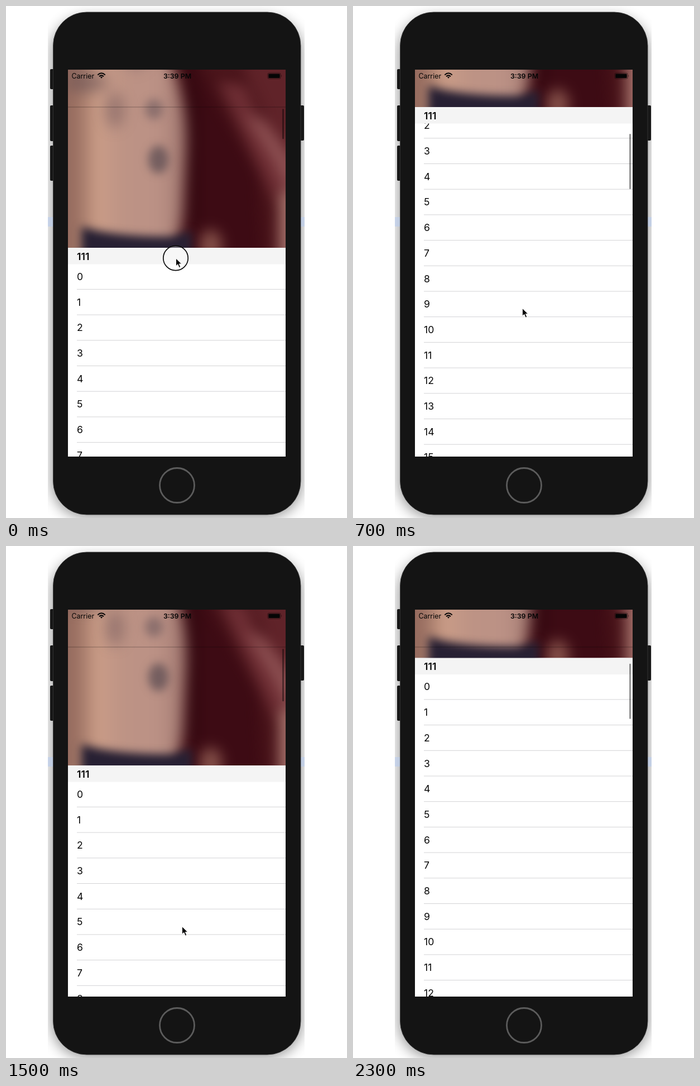
An HTML page that plays this animation: 611x917 px, repeating every 2.4 s.

```html
<!DOCTYPE html>
<html lang="en">
<head>
<meta charset="utf-8">
<title>Stretchy header list</title>
<style>
  html, body { margin: 0; width: 100%; height: 100%; overflow: hidden; background: #fff; }
  svg { display: block; }
  text { font-family: Inter, "Liberation Sans", sans-serif; fill: #050505; }
  .status { font-size: 12.4px; }
  .row { font-size: 17.6px; }
  .bold { font-weight: 600; }
  .soft { filter: url(#blur12); }
  .fine { filter: url(#blur7); }
</style>
</head>
<body>
<svg width="611" height="917" viewBox="0 0 611 917">
  <defs>
    <filter id="blur12" x="-100%" y="-100%" width="300%" height="300%" color-interpolation-filters="sRGB"><feGaussianBlur stdDeviation="12"/></filter>
    <filter id="blur7" x="-100%" y="-100%" width="300%" height="300%" color-interpolation-filters="sRGB"><feGaussianBlur stdDeviation="8"/></filter>
    <linearGradient id="skin" gradientUnits="userSpaceOnUse" x1="0" x2="220" y1="0" y2="0">
      <stop offset="0" stop-color="#93695d"/>
      <stop offset=".13" stop-color="#a67b6b"/>
      <stop offset=".22" stop-color="#cb9d87"/>
      <stop offset=".45" stop-color="#bd9385"/>
      <stop offset=".75" stop-color="#bb9185"/>
      <stop offset="1" stop-color="#98706a"/>
    </linearGradient>
    <clipPath id="page"><rect x="75" width="460" height="917"/></clipPath>
    <clipPath id="screen"><rect x="111" y="114" width="390" height="693"/></clipPath>
    <clipPath id="frame"><rect y="-480" width="390" height="480"/></clipPath>
  </defs>

  <g clip-path="url(#page)">
    <rect x="82" y="20" width="448" height="896" rx="62" opacity=".42" class="soft"/>
    <path d="M75 378h460v17H75z" fill="#b9cdf0" opacity=".6"/>
  </g>
  <g fill="#171717">
    <rect x="79" y="113" width="9" height="36" rx="2"/>
    <rect x="79" y="178" width="9" height="64" rx="2"/>
    <rect x="79" y="250" width="9" height="63" rx="2"/>
    <rect x="524" y="178" width="10" height="63" rx="2"/>
  </g>
  <rect x="84.5" y="11" width="443.5" height="900" rx="60" fill="#141414" stroke="#3a3a3a" stroke-width=".8"/>
  <circle cx="306.5" cy="858.5" r="31" fill="none" stroke="#5c5c5c" stroke-width="2.8"/>

  <g clip-path="url(#screen)">
    <path d="M111 114h390v693H111z" fill="#fff"/>
    <g id="rows"></g>

    <g id="photo"><g clip-path="url(#frame)">
      <path d="M0-480h390V0H0z" fill="#481319"/>
      <g class="soft">
        <path d="M250-330L310-330L420-90V-500H330Z" fill="#602329"/>
        <path d="M268-300L318-290L385-120L372-80Z" fill="#6e2e34"/>
        <path d="M318-240L372-150L410-50V-150L350-230Z" fill="#8d5052"/>
        <path d="M205-380L262-270L340-130L350 30H205Z" fill="#3d0b14"/>
        <ellipse cx="256" cy="-4" rx="20" ry="28" fill="#855049"/>
        <path d="M378-100h40V30h-40z" fill="#a4716a"/>
        <path d="M-40-520H115L140-415Q216-300 212-180L206-60Q200-15 185 40H-40Z" fill="url(#skin)"/>
        <path d="M130-440Q190-390 215-290L222-40H236L234-260Q215-400 160-460Z" fill="#32080f"/>
      </g>
      <g class="soft" fill="#5f4a51">
        <ellipse cx="10" cy="-342" rx="26" ry="13" opacity=".75"/>
        <ellipse cx="34" cy="-296" rx="38" ry="18" opacity=".5"/>
        <ellipse cx="84" cy="-246" rx="17" ry="32" opacity=".4"/>
        <ellipse cx="122" cy="-342" rx="20" ry="24" opacity=".28"/>
      </g>
      <g class="fine">
        <ellipse cx="154" cy="-248" rx="16" ry="18" fill="#67545a" opacity=".55"/>
        <ellipse cx="162" cy="-158" rx="18" ry="25" fill="#55474f" opacity=".68"/>
        <path d="M24 30V-38Q80-20 185-20L222-30V30Z" fill="#272033"/>
      </g>
    </g></g>

    <path id="navLine" d="M111 181h390" stroke="#000" stroke-opacity=".3"/>
    <g id="section">
      <path d="M111 0h390v29.5H111z" fill="#f4f4f4"/>
      <text class="row bold" x="127" y="21.6">111</text>
    </g>
    <rect id="bar" x="495.2" width="2.6" rx="1.3" fill="#000" fill-opacity=".48"/>

    <text class="status" x="117.5" y="129.6">Carrier</text>
    <g fill="none" stroke="#080808" stroke-width="2">
      <path d="M164.3 123.4Q171 117.2 177.7 123.4M167 126.2Q171 122.6 175 126.2"/>
      <path d="M169 127.5Q171 126 173 127.5L171 129.8Z" fill="#080808" stroke="none"/>
    </g>
    <text class="status bold" x="307" y="129.6" text-anchor="middle">3:39 PM</text>
    <rect x="468.9" y="120.1" width="23.2" height="10.2" rx="2.4" fill="none" stroke="#080808" stroke-opacity=".55" stroke-width=".9"/>
    <rect x="470.3" y="121.4" width="20.4" height="7.6" rx="1.3" fill="#050505"/>
    <path d="M493.4 123.3q1.8 1.9 0 3.8z" fill="#080808" opacity=".6"/>
  </g>

  <g id="pointer">
    <circle id="touch" r="22.2" fill="#fff" fill-opacity=".3" stroke="#0a0a0a" stroke-width="1.7"/>
    <path d="M.5.5V14.2L3.8 11.2L6.2 17L8.7 16L6.3 10.4H10.6Z" fill="#050505" stroke="#fff" stroke-width=".9"/>
  </g>
</svg>
<script>
  const el = id => document.getElementById(id);
  const LOOP = 2400, STEP = 100;
  const PIN = 181, REST = 388, ROW = 45.7;

  // Each pose: step, list top, pointer x, pointer y, pointer state
  const HIDDEN = 0, HOVER = 1, TOUCH = 2;
  const poses = [
    [0, 433, 304, 451.5, TOUCH],
    [2, 536.5, 321, 670, TOUCH],
    [3, 520, 322, 690, HOVER],
    [4, 440, 320, 685, TOUCH],
    [6, 195, 306, 570, TOUCH],
    [7, 71, 303, 541, HOVER],
    [8, 40, 300, 400, HOVER],
    [9, 80, 298, 250, TOUCH],
    [11, 252, 300, 417.5, TOUCH],
    [13, 425, 311, 650, TOUCH],
    [14, 428, 315, 681, HOVER],
    [15, 393, 315, 681, HOVER],
    [16, 388, 318, 675, TOUCH],
    [18, 110, 326, 490, TOUCH],
    [19, -45, 328, 446, HOVER],
    [20, -75, 322, 330, HOVER],
    [21, -15, 316, 240, HIDDEN],
    [23, 200.5, 310, 200, HIDDEN]
  ];

  let list = "";
  for (let n = 0; n < 22; n++) {
    const y = n * ROW;
    list += `<text class="row" x="127" y="${y + 57.9}">${n}</text>` +
      `<path d="M127 ${y + 74.4}H501" stroke="#d3d3d5"/>`;
  }
  el("rows").innerHTML = list;

  const move = (id, x, y) => el(id).setAttribute("transform", `translate(${x} ${y})`);
  const show = (id, on) => { el(id).style.display = on ? "" : "none"; };

  function poseAt(step) {
    const i = poses.findLastIndex(p => p[0] <= step);
    const a = poses[i], b = poses[i + 1] || a;
    const k = a === b ? 0 : (step - a[0]) / (b[0] - a[0]);
    return [1, 2, 3].map(j => a[j] + (b[j] - a[j]) * k).concat(a[4]);
  }

  function draw(step) {
    const [top, x, y, state] = poseAt(step);
    const edge = Math.max(top, PIN);
    move("rows", 0, top);
    move("photo", 111, edge);
    move("section", 0, edge);
    show("navLine", top > PIN);

    // The scroll bar shortens while the list is pulled past its rest position
    const pull = Math.max(0, top - REST);
    el("bar").setAttribute("y", 184.3 + Math.max(0, REST - top) * 0.1414);
    el("bar").setAttribute("height", Math.max(7, 99 - pull));

    move("pointer", x, y);
    show("pointer", state !== HIDDEN);
    show("touch", state === TOUCH);
  }

  const start = performance.now();
  let last = -1;
  function tick() {
    const step = Math.floor((performance.now() - start) % LOOP / STEP);
    if (step !== last) draw(last = step);
    requestAnimationFrame(tick);
  }
  tick();
</script>
</body>
</html>
```
